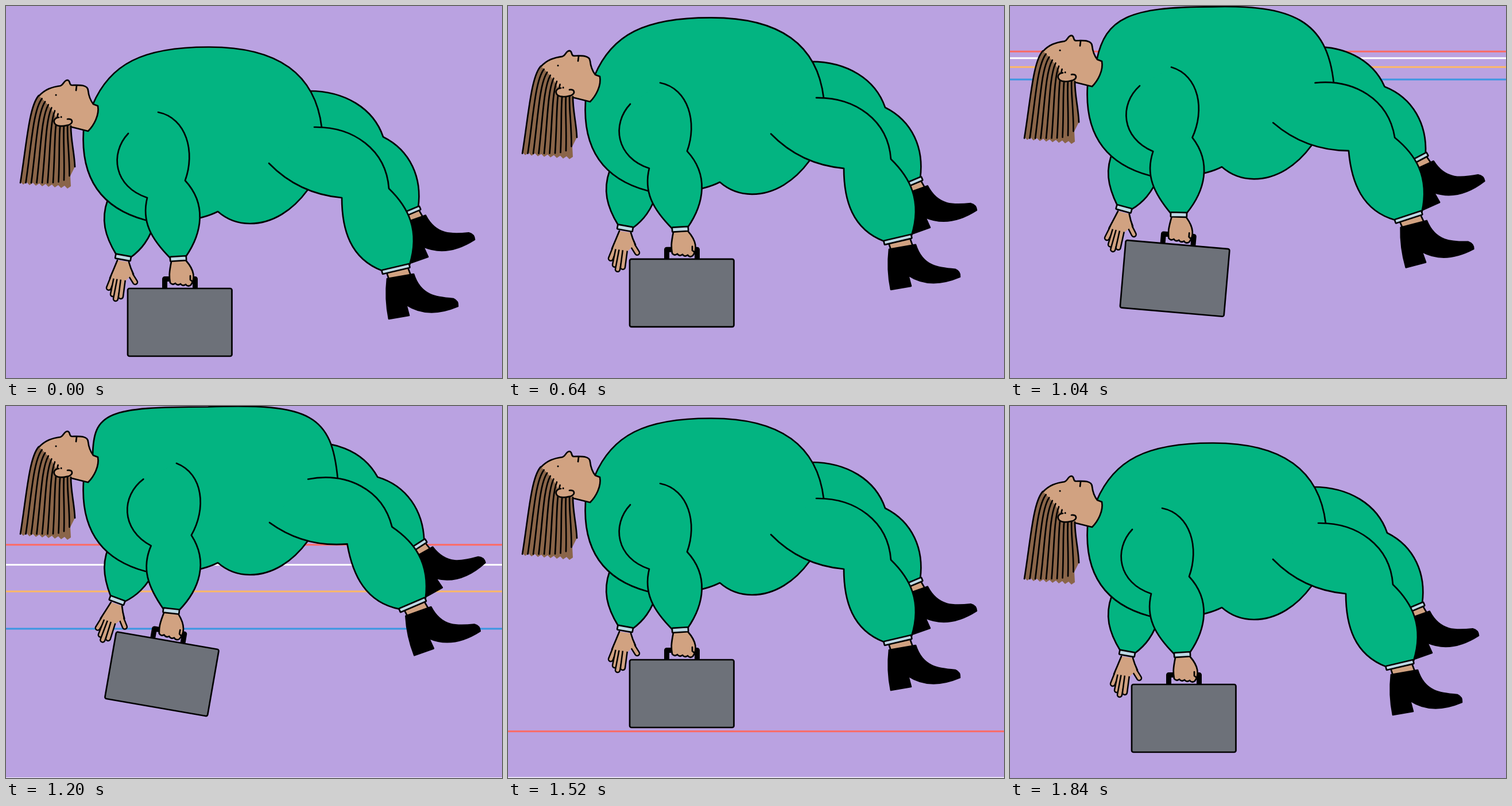
These frames come from a looping animation (864x648 px, 1.92 s). An HTML page with a canvas:

```html
<!DOCTYPE html>
<html lang="en">
<head>
<meta charset="utf-8">
<title>Floating</title>
<style>
html, body { margin: 0; width: 100%; height: 100%; overflow: hidden; background: #baa2e1; }
canvas { display: block; }
</style>
</head>
<body>
<canvas id="stage" width="864" height="648"></canvas>
<script>
const ctx = document.getElementById('stage').getContext('2d');
const W = 864, H = 648, STEP = 80, FRAMES = 24;
const BG = '#baa2e1', GREEN = '#03b481', SKIN = '#d1a281', HAIR = '#8a6549',
      GREY = '#6d7179', CUFF = '#bdd8e4', INK = '#000';
const BARS = ['#ff6a64', '#ffffff', '#fdb866', '#3b97e2'];
const CONTACT = 70.4, TOP = 85;   // lift when the back meets the ceiling, and at the peak
const TILT = 0.172;               // swing of the limbs at the peak
const PEN = 2.7;

let squash = 0;

function fill(color, d) {
  ctx.fillStyle = color;
  ctx.fill(new Path2D(d));
}

function line(d, color = INK, width = PEN) {
  ctx.strokeStyle = color;
  ctx.lineWidth = width;
  ctx.stroke(new Path2D(d));
}

function shape(color, d) {
  fill(color, d);
  line(d);
}

function turned(x, y, angle, draw, toX = x, toY = y) {
  ctx.save();
  ctx.translate(toX, toY);
  ctx.rotate(angle);
  ctx.translate(-x, -y);
  draw();
  ctx.restore();
}

function box(color, x, y, w, h, r) {
  const p = new Path2D();
  p.roundRect(x, y, w, h, r);
  shape(color, p);
}

const cuff = (x, y, w, h, angle) =>
  turned(x, y, angle, () => box(CUFF, x - w / 2, y - h / 2, w, h, 1));

function foot() {
  shape(SKIN, 'M663 464 L667 476 L705 469 L701 458');
  shape(INK, 'M664 475 L710 467 C722 505 750 508 779 510 Q788 514 787 523 ' +
             'Q735 545 697 520 L702 539 L667 545 Q660 510 664 475');
  cuff(679, 458, 49, 7, -0.23);
}

function farLeg() {
  shape(GREEN, 'M528 148 C590 148 640 178 657 228 C705 252 725 300 718 351 L699 359 L540 260');
  turned(702, 539, -0.17, foot, 735, 437);
}

function nearLeg() {
  shape(GREEN, 'M537 211 C605 210 662 250 667 318 C700 350 722 390 703 451 ' +
               'L655 461 C600 440 585 390 585 334 C540 330 495 312 458 274');
  foot();
}

function farArm() {
  shape(GREEN, 'M177 338 C165 372 172 400 192 433 L217 438 C235 425 250 408 262 370');
  const fingers = ['M189 466 L179 491', 'M193 468 L186 502', 'M199 468 L191 510',
                   'M205 468 L200 506', 'M212 460 L225 481'];
  for (const d of fingers) {
    line(d, INK, 10.5);
    line(d, SKIN, 5.5);
  }
  fill(SKIN, 'M194 443 Q186 460 183 474 L209 478 L220 467 Q217 457 214 446');
  line('M194 443 Q187 460 181 474 M214 446 Q217 457 222 467');
  cuff(204, 438, 27, 8, 0.18);
}

function nearArm() {
  shape(GREEN, 'M213 222 C180 257 188 315 246 334 C236 375 252 405 287 440 ' +
               'L313 437 C342 395 350 345 312 304 C330 255 315 195 265 185');
  line('M276.5 490 V475.5 H329.5 V490', INK, 9);
  box(GREY, 212, 492, 181.5, 118, 3);
  shape(SKIN, 'M288 445 C284 465 284 472 286 482' + 'q4 5 9 1'.repeat(4) +
              'C330 475 328 460 314 444');
  line('M321 470 V477 L326 481');
  cuff(300, 440, 28, 8, -0.06);
}

function torso() {
  const n = (rest, pressed) => rest + (pressed - rest) * squash + ' ';
  const top = n(71.5, 86.5);
  shape(GREEN, 'M151 172 C' + n(181, 152) + n(101, 96) + n(238, 176) + top + 352 + ' ' + top +
    'C' + n(450, 530) + n(71, 80) + n(537, 568) + n(102, 100) + n(550, 578) + n(212, 214) +
    'L525 321 C500 355 465 379 425 379 C403 379 385 372 369 358 ' +
    'C340 373 290 379 243 373 C165 352 130 300 135 217');
}

function head() {
  const profile = 'M57 157 C68 145 80 141 95 139 C101 137 100 130 107 129 C113 130 109 138 115 138 ' +
    'C125 138 142 136 143 147 C144 156 146 163 152 171 L160 174 C163 190 153 208 143 218 L115 211';
  fill(SKIN, profile + 'L84 205');
  line(profile);
  line('M123 139 l-1 8');
  fill(HAIR, 'M57 156 C40 175 36 240 25 306' + 'l5 5 l6 -4'.repeat(8) +
    'L112 296 L120 280 C119 255 113 235 113 209 L92 206 Q84 180 57 156');
  for (let i = 0; i <= 10; i++) {
    const end = 308 - 28 * (i / 10) ** 8;
    line(`M${57 + 5.6 * i} ${156 + 5.3 * i} C${40 + 7.3 * i} ${175 + 6 * i} ` +
         `${36 + 8.3 * i} ${240 + 1.5 * i} ${25 + 9.5 * i} ${end}`);
  }
  shape(SKIN, 'M92 194 C80 195 81 209 95 209 C101 210 104 208 110 207 C118 203 116 196 107 197');
  line('M87 155 h.1', INK, 3);
}

// Stripes thrown down from the ceiling, each one crossing a frame faster than the last
function bars(frame) {
  BARS.forEach((color, i) => {
    const k = (frame - 12) / (8 - i);
    if (k <= 0 || k > 1) return;
    ctx.fillStyle = color;
    ctx.fillRect(0, 650 * k - 3.5, W, 3);
  });
  if (frame >= 15 && frame < 22) {
    ctx.fillStyle = '#f4f0fa';
    ctx.fillRect(0, H - 1, W, 1);
  }
}

function draw(now) {
  const frame = Math.floor(now / STEP) % FRAMES;
  const lift = Math.min(6.4 * frame, CONTACT + 3.65 * (frame - 11), 10.75 * (23.65 - frame));
  const rise = frame < 11 ? 6.4 * frame : lift;
  squash = Math.min(1, Math.max(0, (rise - CONTACT) / (TOP - CONTACT)));
  const legs = part => turned(540, 275, -TILT * squash, part);
  const arms = part => turned(282, 370, TILT * squash, part);

  ctx.setTransform(1, 0, 0, 1, 0, 0);
  ctx.fillStyle = BG;
  ctx.fillRect(0, 0, W, H);
  bars(frame);
  ctx.translate(0, -rise);
  ctx.lineCap = ctx.lineJoin = 'round';
  legs(farLeg);
  arms(farArm);
  torso();
  legs(nearLeg);
  arms(nearArm);
  head();
}

const begin = performance.now();
function loop() {
  draw(performance.now() - begin);
  requestAnimationFrame(loop);
}
loop();
</script>
</body>
</html>
```
